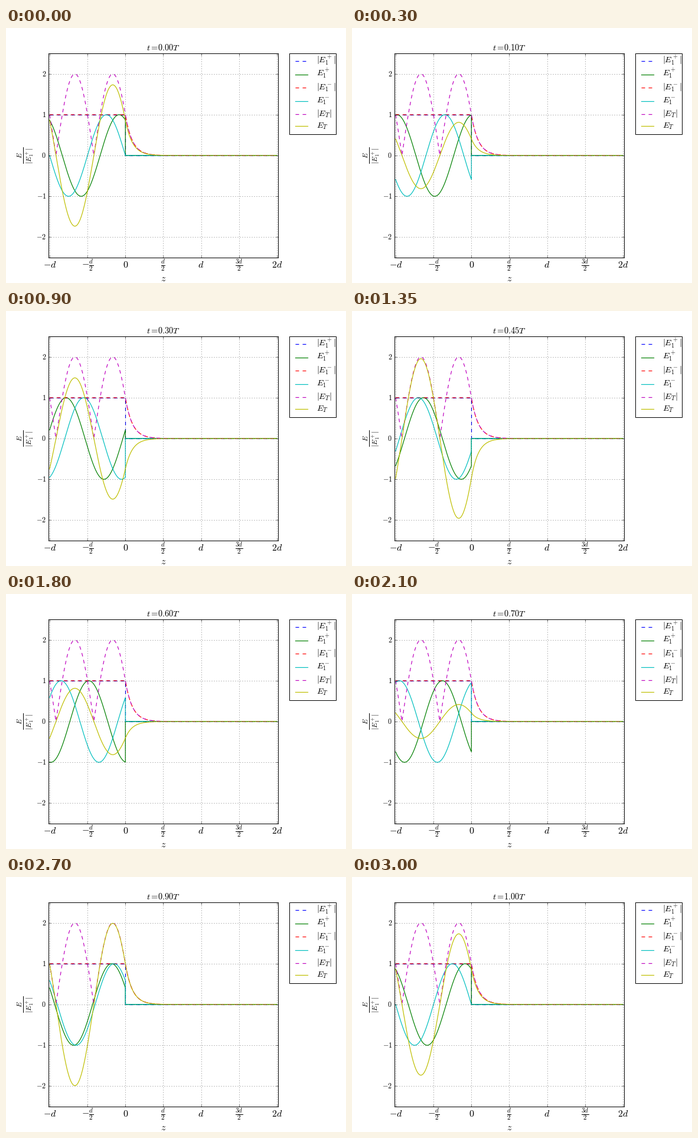
Write a matplotlib script that moves like this. It is 576 px wide and 432 px high and loops after 3.15 s.

```python
import numpy as np
import matplotlib.pyplot as plt
from matplotlib.animation import FuncAnimation
from matplotlib.lines import Line2D
from matplotlib.patches import Rectangle

plt.rcParams.update({
    "mathtext.fontset": "cm",
    "lines.scale_dashes": False,
    "axes.axisbelow": False,
    "axes.linewidth": 1.0,
    "toolbar": "None",
})

W, H, DPI = 576, 432, 72
FRAMES, INTERVAL = 21, 150
DASH = (0, (6, 6))
BLUE, GREEN, RED = (0, 0, 1), (0, 0.5, 0), (1, 0, 0)
CYAN, MAGENTA, YELLOW = (0, 0.75, 0.75), (0.75, 0, 0.75), (0.75, 0.75, 0)

fig = plt.figure(figsize=(W / DPI, H / DPI), dpi=DPI, facecolor="white")
ax = fig.add_axes([0.125, 0.1, 0.675, 0.8])
ax.set_xlim(-1.015, 2.015)
ax.set_ylim(-2.5, 2.5)
ax.set_xticks(np.arange(-1, 2.1, 0.5), labels=[])
ax.set_yticks(range(-2, 3), labels=[])
ax.tick_params(direction="in", length=4, width=0.5, top=True, right=True)
ax.grid(True, color="black", lw=0.5, ls=(0, (1, 3)))


def label(x, y, s, size, ha="center", va="baseline", **kw):
    """Text at stage pixels, y measured from the top."""
    return fig.text(x / W, 1 - y / H, s, size=size, ha=ha, va=va, **kw)


def data_x(z):
    return 72 + (z + 1.015) * 388.8 / 3.03


X_LABELS = ["$-d$", r"$-\frac{d}{2}$", "$0$", r"$\frac{d}{2}$", "$d$",
            r"$\frac{3d}{2}$", "$2d$"]
for i, s in enumerate(X_LABELS):
    label(data_x(-1 + i / 2), 405.5, s, 16)
for v in range(-2, 3):
    label(68, 220 - v * 69.12, f"${v}$", 12, ha="right")
label(266.4, 429, "$z$", 16)
label(33, 216, r"$\frac{E}{|E_1^+|}$", 17, va="center", rotation=90)
title = label(267, 38.2, "", 14.4)

# Standing wave left of the boundary, evanescent decay right of it
zl = np.linspace(-1, 0, 301)
zr = np.linspace(0, 2, 601)
z = np.concatenate([zl, zr])
K = 2 * np.pi
decay = np.exp(-K * np.sqrt(3) * zr)
ones, zeros = np.ones_like(zl), np.zeros_like(zr)


def join(left, right):
    return np.concatenate([left, right])


def waves(t):
    forward = np.cos(K * t - K * zl - np.pi / 6)
    backward = np.cos(K * t + K * zl + np.pi / 2)
    passed = np.cos(K * t + np.pi / 6) * decay
    return (join(forward, zeros), join(backward, zeros),
            join(forward + backward, passed))


envelope = join(np.abs(2 * np.cos(K * zl + np.pi / 3)), decay)
start = waves(0)
CURVES = [
    (join(ones, zeros), BLUE, DASH, "$|E_1^+|$"),
    (start[0], GREEN, "-", "$E_1^+$"),
    (join(ones, decay), RED, DASH, "$|E_1^-|$"),
    (start[1], CYAN, "-", "$E_1^-$"),
    (envelope, MAGENTA, DASH, "$|E_T|$"),
    (start[2], YELLOW, "-", "$E_T$"),
]
lines = [ax.plot(z, y, color=c, ls=ls, lw=1.2)[0] for y, c, ls, _ in CURVES]
moving = lines[1::2]

# Legend
fig.add_artist(Rectangle((480.24 / W, 1 - 179.6 / H), 79 / W, 136.4 / H,
                         fc="white", ec="black", lw=1))
ROWS = [56.3, 78.8, 101.3, 123.8, 146.3, 166.3]
for (_, c, ls, name), y in zip(CURVES, ROWS):
    fig.add_artist(Line2D([490 / W, 511 / W], [1 - y / H] * 2,
                          color=c, ls=ls, lw=1.2))
    label(525.5, y + 3, name, 14.4, ha="left")


def update(i):
    t = i / 20
    for line, y in zip(moving, waves(t)):
        line.set_ydata(y)
    title.set_text(rf"$t=\!\mathbf{{{t:.2f}}}T$")
    return [*moving, title]


anim = FuncAnimation(fig, update, frames=FRAMES, interval=INTERVAL,
                     init_func=lambda: update(0), repeat=True, repeat_delay=0)
plt.show()
```
